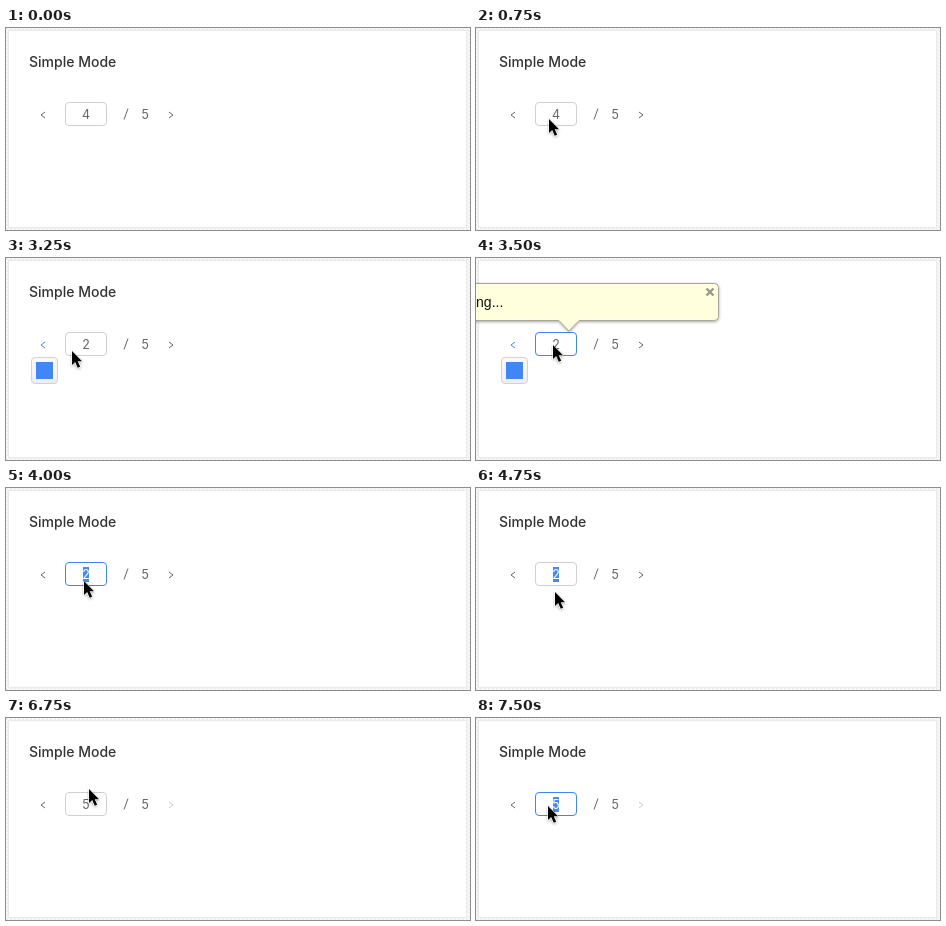
Animation of 464x202 px, one loop 8000 ms. Source, as an HTML page:

```html
<!DOCTYPE html>
<html lang="en">
<head>
<meta charset="utf-8">
<title>Simple pagination</title>
<style>
  html, body { margin: 0; width: 100%; height: 100%; overflow: hidden; background: #fff; }
  svg { display: block; width: 464px; height: 202px; }
  text { font-family: Inter, Roboto, sans-serif; }
  .label { font-size: 12.5px; fill: #666; }
  .line { fill: none; stroke: #666; }
  .popup text { font: 14px "Liberation Sans", sans-serif; fill: #111; }
</style>
</head>
<body>
<svg viewBox="0 0 464 202">
  <defs>
    <pattern id="weave" width="4" height="4" patternUnits="userSpaceOnUse">
      <rect width="4" height="4" fill="#f8f8f8"/>
      <path d="M0 0L4 4" stroke="#e7e7e7"/>
    </pattern>
    <linearGradient id="button" x2="0" y2="1">
      <stop stop-color="#fafafa"/><stop offset="1" stop-color="#eee"/>
    </linearGradient>
    <filter id="shade" x="-20%" y="-20%" width="140%" height="150%">
      <feDropShadow dx="0" dy="1" stdDeviation="1.5" flood-opacity=".35"/>
    </filter>
  </defs>

  <rect width="464" height="202" fill="url(#weave)"/>
  <rect x="2.5" y="2.5" width="458" height="197" fill="#fff" stroke="#e9e9e9"/>
  <text x="23" y="39" font-size="14" font-weight="500" fill="#333">Simple Mode</text>

  <path id="prev" class="line" d="M39 84L35 87L39 90"/>
  <rect id="field" x="59.5" y="74.5" width="41" height="23" rx="3.5" fill="#fff"/>
  <rect id="selection" x="77" y="79" width="6" height="15" fill="#4489f4"/>
  <text id="value" class="label" x="80" y="91" text-anchor="middle"></text>
  <path id="caret" d="M83.5 79V94" stroke="#333"/>
  <path class="line" d="M122 80.5L118 91.5"/>
  <text class="label" x="139.2" y="90.5" text-anchor="middle">5</text>
  <path id="next" class="line" d="M163 84L167 87L163 90"/>

  <g id="icon">
    <rect x="25.5" y="99.5" width="26" height="26" rx="3.5" fill="url(#button)" stroke="#d2d2d2"/>
    <rect x="30" y="104" width="17" height="17" fill="#4285f4"/>
  </g>

  <g id="popup" class="popup">
    <path d="M-9 25.5H238.5Q242.5 25.5 242.5 29.5V58.5Q242.5 62.5 238.5 62.5H103L93 73L83 62.5H-9Z"
          fill="#ffffdd" stroke="#a5a59a" filter="url(#shade)"/>
    <text x="27.3" y="49" text-anchor="end">Translating...</text>
    <path d="M230.5 30.5L237.5 37.5M237.5 30.5L230.5 37.5" stroke="#99998c" stroke-width="2.4"/>
  </g>

  <path id="cursor" d="M0 0V14L3.2 11.1L5.7 16.8L8.2 15.7L5.7 10.2H10Z"
        fill="#000" stroke="#fff" stroke-width="1" paint-order="stroke" filter="url(#shade)"/>
</svg>
<script>
const LOOP = 8000;

// Time, pointer x and y, field value, active states.
const steps = [
  [0, null, null, 4, ""],
  [250, 62, 106, 4, ""],
  [500, 68, 100, 4, ""],
  [750, 73, 91, 4, ""],
  [1000, 70, 100, 4, ""],
  [1500, 80, 92, 4, "hover"],
  [1750, 82, 91, 4, "hover caret"],
  [2250, 56, 98, 4, ""],
  [2500, 36, 90, 3, "prev"],
  [2750, 35, 89, 2, "prev"],
  [3250, 66, 93, 2, "prev icon"],
  [3500, 77, 87, 2, "prev icon hover popup"],
  [3750, 77, 90, 2, "hover caret"],
  [4000, 78, 93, 2, "hover selection"],
  [4250, 79, 95, 2, "hover selection"],
  [4500, 79, 99, 2, "hover selection"],
  [4750, 79, 104, 2, "selection"],
  [5000, 79, 101, 5, "caret"],
  [5250, 79, 101, 5, ""],
  [5750, 79, 101, 5, "caret last"],
  [6250, 146, 141, 5, "last"],
  [6500, 115, 122, 5, "caret last"],
  [6750, 83, 71, 5, "last"],
  [7000, 70, 87, 5, "hover caret last"],
  [7250, 72, 88, 5, "hover selection last"]
];

const el = id => document.getElementById(id);
const show = (id, on) => { el(id).style.display = on ? "" : "none"; };
const stroke = (id, color) => { el(id).style.stroke = color; };

function draw(time) {
  const [, x, y, value, states] = steps.findLast(step => step[0] <= time);
  const active = new Set(states.split(" "));

  for (const id of ["selection", "caret", "icon", "popup"]) show(id, active.has(id));
  show("cursor", x !== null);
  el("cursor").setAttribute("transform", `translate(${x ?? 0} ${y ?? 0})`);
  el("value").textContent = value;
  el("value").style.fill = active.has("selection") ? "#fff" : "#666";
  stroke("field", active.has("hover") ? "#3c85f2" : "#d0d0d0");
  stroke("prev", active.has("prev") ? "#3c85f2" : "#666");
  stroke("next", active.has("last") ? "#ccc" : "#666");
}

const start = performance.now();
function tick() {
  draw((performance.now() - start) % LOOP);
  requestAnimationFrame(tick);
}
tick();
</script>
</body>
</html>
```
